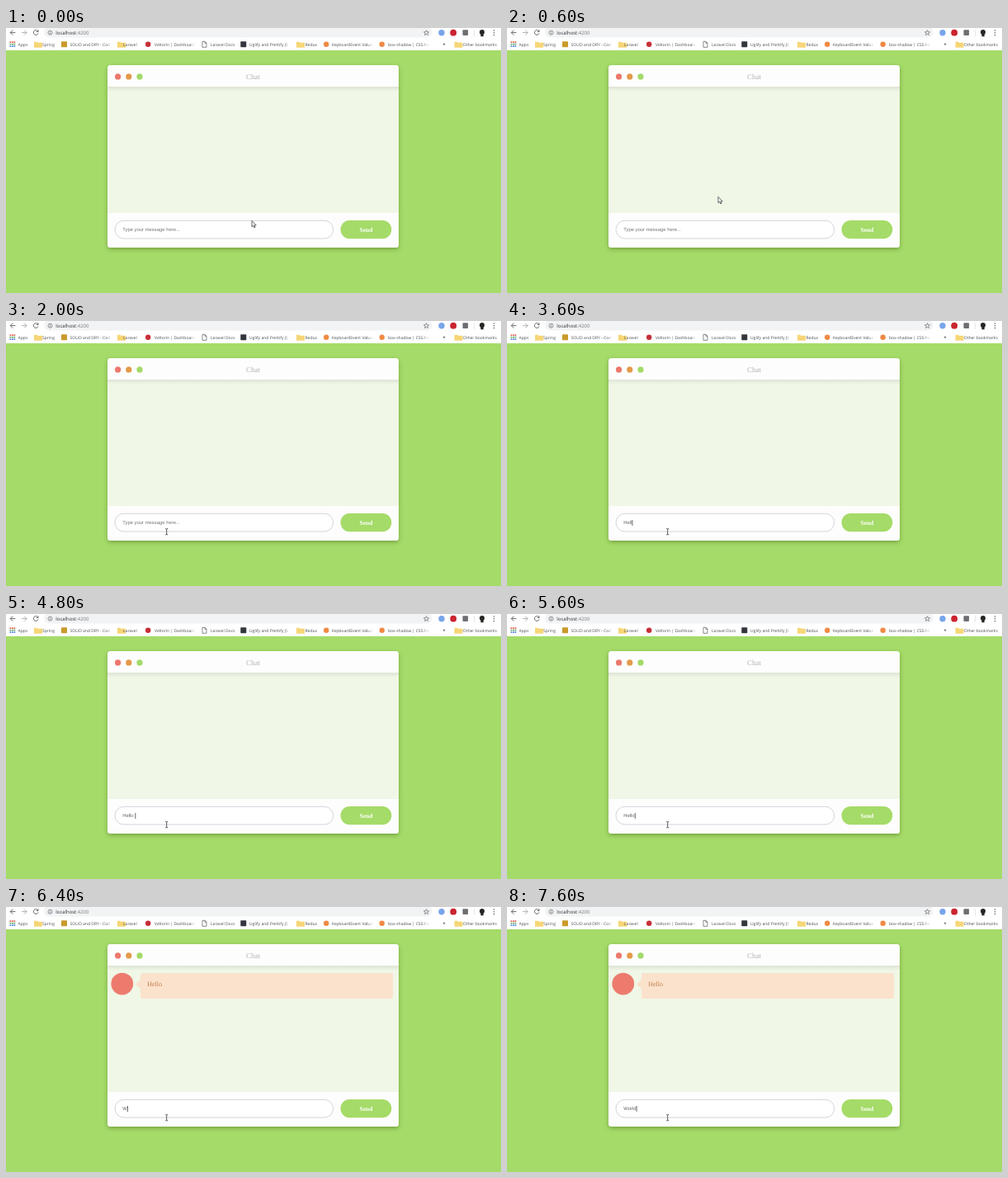
An HTML page that plays this animation: 600 px wide and 321 px high, repeating every 8 s.

```html
<!DOCTYPE html>
<html lang="en">
<head>
<meta charset="utf-8">
<title>Chat</title>
<style>
  html, body { margin: 0; width: 100%; height: 100%; overflow: hidden; background: #a5db68; }
  svg { display: block; }
  #stage { width: 100vw; height: 100vh; }
  text { text-rendering: geometricPrecision; white-space: pre; }
  .ui { font-family: "Open Sans", "Noto Sans", sans-serif; font-size: 5px; fill: #4c4f53; }
  .url { font-size: 5.95px; fill: #2c2e31; }
  .serif { font-family: "Liberation Serif", "Noto Serif", serif; }
  .field { font-family: "Liberation Sans", Arial, sans-serif; font-size: 5.9px; }
  .line { fill: none; stroke: #56595d; stroke-width: .9; }
</style>
</head>
<body>
<svg id="stage" viewBox="0 0 600 321">
  <defs>
    <linearGradient id="fade">
      <stop offset="0" stop-color="#fff" stop-opacity="0"/>
      <stop offset="1" stop-color="#fff"/>
    </linearGradient>
    <linearGradient id="under" x2="0" y2="1">
      <stop offset="0" stop-color="#000" stop-opacity=".075"/>
      <stop offset="1" stop-color="#000" stop-opacity="0"/>
    </linearGradient>
    <filter id="shadow" x="-10%" y="-10%" width="120%" height="125%">
      <feDropShadow dx="0" dy="2" stdDeviation="2.6" flood-color="#2c4a10" flood-opacity=".38"/>
    </filter>
  </defs>

  <rect width="600" height="321" fill="#a5db68"/>

  <!-- browser bar -->
  <rect width="600" height="27" fill="#fff"/>
  <rect x="46" y="-1" width="470.500" height="12.500" rx="6" fill="#f1f3f4"/>
  <path class="line" d="M11.300 5.600H5.300M8.200 2.600l-3 3 3 3"/>
  <path class="line" d="M19 5.600h6M22 2.600l3 3-3 3" stroke-opacity=".5"/>
  <path class="line" d="M38.600 3.800a2.900 2.900 0 1 0 .4 2.600M39 2.300v2.200h-2.200"/>
  <circle class="line" cx="53.500" cy="5.700" r="2.500" style="stroke-width:.65"/>
  <path class="line" d="M53.500 5.300v1.900M53.500 4v.7" style="stroke-width:.7"/>
  <text class="ui url" x="60.300" y="7.700">localhost<tspan fill="#777a7e">:4200</tspan></text>
  <path class="line" style="stroke-width:.65" d="M509.500 2.700l.9 2 2.200.2-1.700 1.400.5 2.200-1.900-1.200-1.900 1.200.5-2.200-1.700-1.400 2.200-.2z"/>
  <circle cx="528" cy="5.700" r="3.700" fill="#78a5ea"/>
  <circle cx="542.200" cy="5.700" r="3.900" fill="#cb2431"/>
  <rect x="553.500" y="2.200" width="6.600" height="6.800" rx="1" fill="#6d6f72"/>
  <path d="M567.500 2v8" stroke="#d5d7da" stroke-width=".6"/>
  <path d="M574 5a3 3 0 0 1 6 0q0 2-1.300 3v2.300h-3.300V8Q574 7 574 5z" fill="#252622"/>
  <g fill="#56595d">
    <circle cx="591.500" cy="3" r=".75"/><circle cx="591.500" cy="5.700" r=".75"/><circle cx="591.500" cy="8.400" r=".75"/>
  </g>
  <g id="marks"></g>

  <!-- chat window -->
  <rect x="123" y="45" width="353" height="221" rx="3.500" fill="#fdfdfd" filter="url(#shadow)"/>
  <rect x="123" y="71" width="353" height="153" fill="#f0f7e6"/>
  <rect x="123" y="71" width="353" height="6" fill="url(#under)"/>
  <circle cx="135.600" cy="58.900" r="3.600" fill="#ec786c"/>
  <circle cx="148.800" cy="58.900" r="3.600" fill="#e39a49"/>
  <circle cx="162" cy="58.900" r="3.600" fill="#a3da68"/>
  <text class="serif" x="299.600" y="62" text-anchor="middle" font-size="9" fill="#b2b2b2">Chat</text>

  <g id="message">
    <circle cx="140.800" cy="93.100" r="13.400" fill="#ec7b6e"/>
    <path d="M157 93.500l6-5.500v11z" fill="#fbe2cc"/>
    <rect x="163" y="80" width="306" height="31" rx="2" fill="#fbe2cc"/>
    <text class="serif" x="171.200" y="95.800" font-size="8.100" fill="#bf7f4d">Hello</text>
  </g>

  <rect x="132" y="233.300" width="264.700" height="21.700" rx="10.850" fill="#fff" stroke="#cfcfda" stroke-width=".9"/>
  <text id="entry" class="field" x="141.200" y="246.300"></text>
  <rect id="caret" y="241" width=".8" height="7" fill="#444"/>
  <rect x="405.500" y="233" width="61.800" height="22.200" rx="11.100" fill="#a5db68"/>
  <text class="serif" x="436.400" y="247" text-anchor="middle" font-size="7.500" font-weight="700" fill="#fff">Send</text>

  <path id="arrow" d="M0 0v7.300l1.700-1.500 1.200 2.700 1.200-.6-1.200-2.500h2.300z" fill="#fff" stroke="#333" stroke-width=".75"/>
  <path id="beam" d="M-1.500-3.700q1.500 0 1.500.8 0-.8 1.500-.8M0-2.900v5.800M-1.500 3.700q1.500 0 1.500-.8 0 .8 1.500.8" fill="none" stroke="#333" stroke-width=".8"/>
</svg>

<script>
const LOOP = 8000, STEP = 200;
const $ = id => document.getElementById(id);
const entry = $("entry"), caret = $("caret"), arrow = $("arrow"), beam = $("beam"), message = $("message");

const folder = x => `<path d="M${x} 16.800h3.500l1 1h5.500v6h-10z" fill="#f6d677"/>`;
const square = color => x => `<rect x="${x}" y="16.200" width="7" height="7" rx=".6" fill="${color}"/>`;
const dot = color => x => `<circle cx="${x + 3.7}" cy="19.700" r="3.200" fill="${color}"/>`;
const page = x => `<path class="line" style="stroke-width:.7" d="M${x} 16.300h3l2 2v5h-5zM${x + 3} 16.300v2h2"/>`;
const apps = x => [0, 1, 2, 3, 4, 5, 6, 7, 8].map(i =>
  `<rect x="${x + i % 3 * 2.5}" y="${16.3 + Math.floor(i / 3) * 2.5}" width="1.700" height="1.700"
    fill="${["#e05a4b", "#58a65c", "#4f83dd"][Math.floor(i / 3)]}"/>`).join("");

// icon, icon x, text x, label, clip width (0 = uncut)
const bookmarks = [
  [apps, 4.5, 14.6, "Apps", 0],
  [folder, 34, 44, "Spring", 0],
  [square("#c99a2c"), 67, 77.5, "SOLID and DRY - Cod", 50],
  [folder, 135, 142, "Laravel", 0],
  [dot("#c62f36"), 168.500, 180, "Veltorin | Dashboard", 49],
  [page, 238, 248, "Laravel Docs", 0],
  [square("#33373d"), 284.300, 295, "Uglify and Prettify JS", 49],
  [folder, 352, 362.500, "Redux", 0],
  [dot("#f08a45"), 384.500, 395, "KeyboardEvent Value", 49.500],
  [dot("#f08a45"), 452, 463, "box-shadow | CSS-Notes", 48.500],
  [folder, 543.500, 553.800, "Other bookmarks", 0]
];
$("marks").innerHTML = bookmarks.map(([icon, ix, x, label, cut]) => {
  const w = cut || 60;
  const fade = cut ? `<rect x="${w - 6}" width="6" height="12" fill="url(#fade)"/>` : "";
  return icon(ix) + `<svg x="${x}" y="14" width="${w}" height="12">
    <text class="ui" y="7.600">${label}</text>${fade}</svg>`;
}).join("") + `<text class="ui" x="529.500" y="21.300" font-weight="700">»</text>`;

// pointer place at each step
const path = [[298, 233.500], [290, 227], [272, 215], [256, 204.500], [240, 190], [223, 173],
  [214, 165.500], [202, 178], [190, 212], [189.500, 243], [194.700, 255.200]];
const BEAM_AT = 9;

// time, typed text, caret shown
const typing = [
  [0, "", 0], [2400, "", 1], [2800, "", 0],
  [3000, "H", 1], [3200, "He", 1], [3400, "Hel", 1], [3600, "Hell", 1], [3800, "Hello", 1],
  [4000, "Hello ", 1], [4200, "Hello w", 1], [4800, "Hello ", 1], [5000, "Hello", 1],
  [5400, "Hello", 0], [5600, "Hello", 1],
  [5800, "", 1], [6200, "", 0],
  [6400, "W", 1], [6800, "Wo", 1], [7200, "Wor", 1], [7400, "Worl", 1], [7600, "World", 1]
];
const SENT = 5800;

const show = (el, on) => el.setAttribute("visibility", on ? "visible" : "hidden");

function draw(t) {
  const step = Math.min(Math.floor(t / STEP), path.length - 1);
  const place = `translate(${path[step]})`;
  arrow.setAttribute("transform", place);
  beam.setAttribute("transform", place);
  show(arrow, step < BEAM_AT);
  show(beam, step >= BEAM_AT);

  const [, text, blink] = typing.filter(k => k[0] <= t).pop();
  entry.textContent = text || "Type your message here...";
  entry.setAttribute("fill", text ? "#666" : "#74777a");
  caret.setAttribute("x", 141.1 + (text ? entry.getComputedTextLength() + .3 : 0));
  show(caret, blink);
  show(message, t >= SENT);
}

const start = performance.now();
function tick() {
  draw((performance.now() - start) % LOOP);
  requestAnimationFrame(tick);
}
tick();
</script>
</body>
</html>
```
